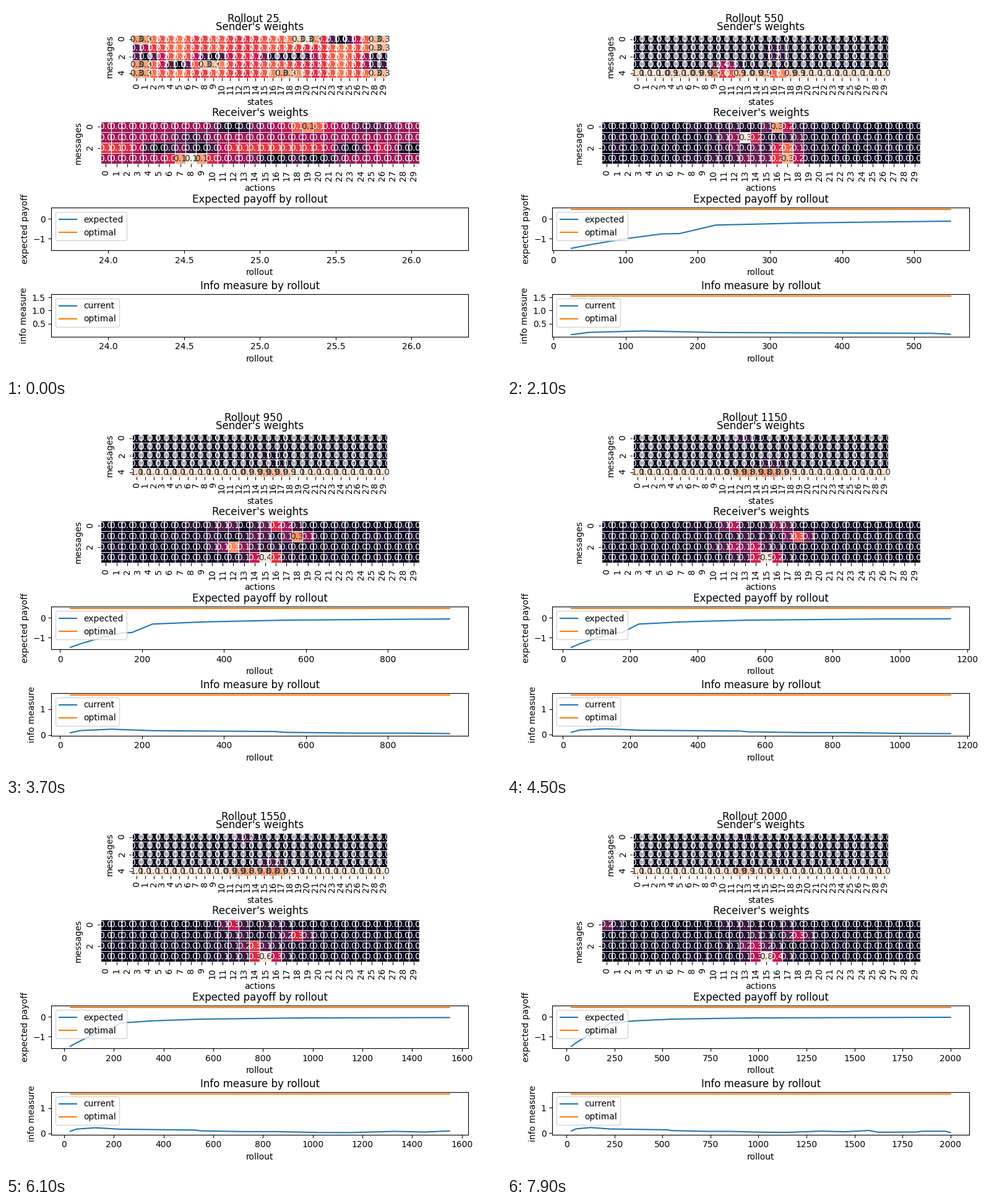
Write a matplotlib script that moves like this. It is 800x600 px and loops after 8 s.

```python
import numpy as np
import matplotlib.pyplot as plt
from matplotlib.animation import FuncAnimation
from matplotlib.colors import LinearSegmentedColormap

N, COLS = 80, 30
plt.rcParams["font.family"] = "DejaVu Sans"
rng = np.random.default_rng(4)
rollouts = 25 * np.arange(1, N + 1)
cols = np.arange(COLS)

rocket = LinearSegmentedColormap.from_list("rocket", [
    (0, "#03051A"), (1 / 7, "#36193E"), (1 / 4, "#611F53"), (2 / 7, "#701F57"),
    (3 / 7, "#AE1759"), (1 / 2, "#CB1B4F"), (4 / 7, "#E13342"), (5 / 7, "#F37651"),
    (3 / 4, "#F4875E"), (6 / 7, "#F6B48E"), (1, "#FAEBDD")])


# ---- learning curves -------------------------------------------------
def through(*points):
    return np.interp(rollouts, *zip(*points))


payoff = through((25, -1.49), (50, -1.31), (100, -1), (150, -.76), (175, -.74),
                 (225, -.31), (350, -.2), (550, -.11), (950, -.05), (2000, -.015))
info = through((25, .083), (50, .17), (125, .222), (225, .165), (525, .132),
               (550, .1), (725, .07), (850, .07), (1025, .035), (1150, .03),
               (1325, .08), (1450, .055), (1575, .105), (1625, .035),
               (1825, .045), (1850, .075), (1975, .075), (2000, .02))


# ---- weights: Gaussian bumps over noise, blended between stages ---------
def bumps(rows, marks, width):
    """Sum of bumps given as (row, column, gain)."""
    m = np.zeros((rows, COLS))
    for row, col, gain in marks:
        m[row] += gain * np.exp(-((cols - col) / width) ** 2 / 2)
    return m


def first_weights(rows, marks, axis):
    """Uniform weights, reinforced or punished around a few cells."""
    m = np.clip(1 + bumps(rows, marks, 1.2), .02, None)
    return m / m.sum(axis=axis, keepdims=True)


def learned_sender(t, leaks):
    """Nearly every state uses the last message, apart from a few leaks."""
    m = .03 * (1.3 - t) * rng.random((5, COLS)) ** 3 + bumps(5, leaks, 1)
    m[4] = 1 - m[:4].sum(axis=0)
    return m


def learned_receiver(t, peaks):
    """One growing peak per message, with clutter near the middle actions."""
    gains = [.2, .2 + .1 * t, .2 + .1 * t, .23 + .45 * t ** 2]
    clutter = .12 * np.exp(-((cols - 14) / 3) ** 2 / 2) * rng.random((4, COLS))
    noise = .036 * rng.random((4, COLS)) ** 2
    return noise + clutter + bumps(4, zip(range(4), peaks, gains), .75)


stages = {  # rollout: (sender leaks, receiver peak of each message)
    275: ([(3, 10, .35), (3, 17, .2), (2, 17.5, .12), (1, 23.2, .65)], (0, 14, 20, 22)),
    550: ([(3, 10.3, .42), (1, 16.4, .14), (2, 16.2, .14)], (16, 13, 17, 17)),
    950: ([(2, 15.5, .09), (3, 16.5, .06)], (16, 18, 12, 15)),
    1350: ([(0, 12.6, .28), (3, 15.5, .27)], (12, 18, 14, 15)),
    1725: ([(0, 12.5, .06), (3, 16.5, .17)], (12, 18, 14, 15)),
    2000: ([(0, 12.3, .08), (3, 16, .05)], (0, 18, 14, 15))}

key_rollouts = [25, *stages]
sender_keys = [first_weights(5, [
    (0, 24, -1), (0, 20, .8), (1, 0, -.7), (2, 1, -1), (2, 9, -1), (2, 16, -.8),
    (2, 19, -1), (2, 28.5, -1), (3, 5, -1), (3, 28.5, -.9), (3, 8, .5), (4, 18, .4)],
    axis=0)]
receiver_keys = [first_weights(4, [
    (0, 12, -1), (0, 25, -.5), (0, 19, 1), (1, 8, -.6), (2, 5, -1), (2, 9, -1),
    (2, 23, -1), (2, 28.7, -1), (3, 16, -1), (3, 20, -1), (3, 8, 1.6)],
    axis=1)]
for rollout, (leaks, peaks) in stages.items():
    sender_keys.append(learned_sender(rollout / 2000, leaks))
    receiver_keys.append(learned_receiver(rollout / 2000, peaks))


def blend(keys, rollout):
    position = np.interp(rollout, key_rollouts, range(len(keys)))
    i = min(int(position), len(keys) - 2)
    t = position - i
    return (1 - t) * keys[i] + t * keys[i + 1]


# ---- figure ----------------------------------------------------------
fig, axes = plt.subplots(4, figsize=(8, 6), dpi=100, facecolor="white")
fig.tight_layout(pad=3)
suptitle = fig.suptitle("Rollout 25")


def luminance(rgb):
    linear = np.where(rgb <= .03928, rgb / 12.92, ((rgb + .055) / 1.055) ** 2.4)
    return linear @ [.2126, .7152, .0722]


class Heatmap:
    def __init__(self, ax, rows, title, xlabel):
        self.mesh = ax.pcolormesh(np.zeros((rows, COLS)), cmap=rocket,
                                  edgecolors="white", linewidth=.5)
        ax.set(title=title, xlabel=xlabel, ylabel="messages",
               xlim=(0, COLS), ylim=(rows, 0), aspect="equal")
        ax.spines[:].set_visible(False)
        ax.set_xticks(cols + .5, cols, rotation=90)
        ax.set_yticks(np.arange(0, rows, 2) + .5, range(0, rows, 2), rotation=90)
        self.labels = [ax.text(c + .5, r + .5, "", ha="center", va="center")
                       for r in range(rows) for c in cols]

    def show(self, values):
        self.mesh.set_array(values)
        self.mesh.set_clim(values.min(), values.max())
        flat = values.ravel()
        light = luminance(rocket(self.mesh.norm(flat))[:, :3]) > .408
        for label, value, is_light in zip(self.labels, flat, light):
            label.set_text(f"{abs(value):.1f}")
            label.set_color(".15" if is_light else "w")


class Curve:
    def __init__(self, ax, title, ylabel, name, values, optimum):
        self.ax = ax
        ax.set(title=title, xlabel="rollout", ylabel=ylabel)
        self.series = [values, np.full(N, optimum)]
        self.lines = [ax.plot([], [], label=n)[0] for n in (name, "optimal")]
        ax.legend(loc="upper left")

    def show(self, count):
        for line, values in zip(self.lines, self.series):
            line.set_data(rollouts[:count], values[:count])
        self.ax.relim()
        self.ax.autoscale_view()


sender = Heatmap(axes[0], 5, "Sender's weights", "states")
receiver = Heatmap(axes[1], 4, "Receiver's weights", "actions")
curves = [
    Curve(axes[2], "Expected payoff by rollout", "expected payoff", "expected",
          payoff, .47),
    Curve(axes[3], "Info measure by rollout", "info measure", "current", info, 1.548)]


def update(frame):
    rollout = rollouts[frame]
    suptitle.set_text(f"Rollout {rollout}")
    sender.show(blend(sender_keys, rollout))
    receiver.show(blend(receiver_keys, rollout))
    for curve in curves:
        curve.show(frame + 1)
    return []


anim = FuncAnimation(fig, update, frames=N, interval=100, repeat=True,
                     repeat_delay=0, init_func=lambda: update(0))
plt.show()
```
